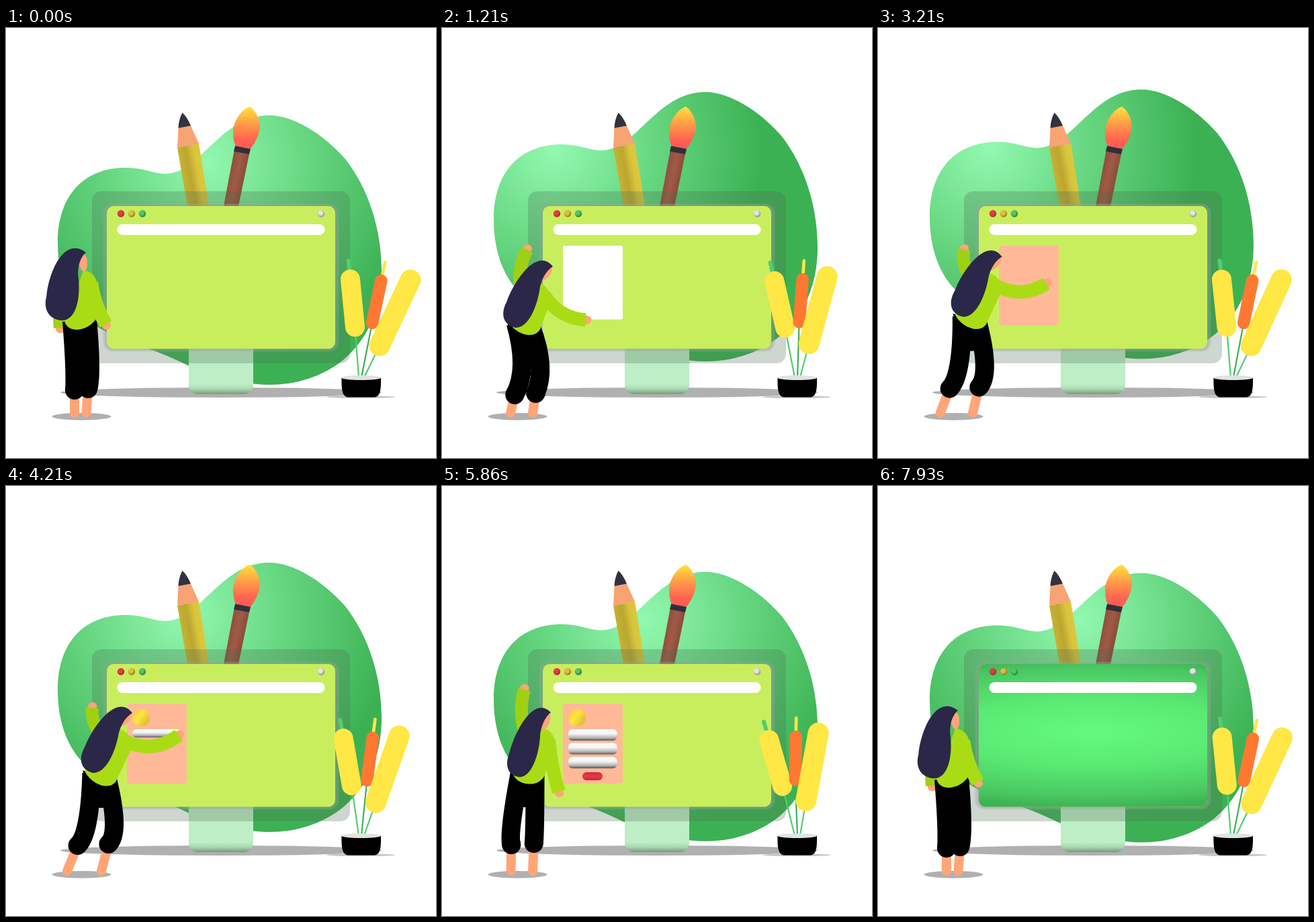
Animation, 640 px wide and 640 px high, one loop 8000 ms. Source, as an HTML page with a canvas:

```html
<!DOCTYPE html>
<html lang="en">
<head>
<meta charset="utf-8">
<title>Building a page</title>
<style>
html, body { margin: 0; width: 100%; height: 100%; overflow: hidden; background: #fff; }
canvas { display: block; width: 100vw; height: 100vh; }
</style>
</head>
<body>
<canvas id="stage"></canvas>
<script>
const LOOP = 8000, SIZE = 640;
const LIME = '#c9ee5d', SHIRT = '#aadc16', SKIN = '#ffa577', NAVY = '#2b2748';
const canvas = document.getElementById('stage');
const c = canvas.getContext('2d');
const ratio = window.devicePixelRatio || 1;
canvas.width = canvas.height = SIZE * ratio;

// --- timing ---
const lerp = (a, b, u) => a + (b - a) * u;
const mix = (a, b, u) => a.map((v, i) => lerp(v, b[i], u));
const span = (t, from, to) => Math.min(1, Math.max(0, (t - from) / (to - from)));
const ease = u => u * u * (3 - 2 * u);

// Quick rise, then a long sinking tail.
const lift = t => t < 2400
  ? 1 - (1 - t / 2400) ** 2.5
  : 1 / (1 + ((t - 2400) / 1580) ** 3.6);

// Two swings to the left and back.
const sway = t => span(t, 0, 2150) ** .8 - span(t, 2230, 3200) + span(t, 3100, 6100) - span(t, 6530, 7950);

// --- drawing helpers ---
function gradient(g, stops) {
  stops.forEach(([at, color]) => g.addColorStop(at, color));
  return g;
}
const linear = (x0, y0, x1, y1, ...stops) => gradient(c.createLinearGradient(x0, y0, x1, y1), stops);
const radial = (x, y, r, ...stops) => gradient(c.createRadialGradient(x, y, 0, x, y, r), stops);

function fill(path, color) {
  c.fillStyle = color;
  c.fill(new Path2D(path));
}
function box(x, y, w, h, r, color) {
  if (w <= 0 || h <= 0) return;
  c.beginPath();
  c.roundRect(x, y, w, h, r);
  c.fillStyle = color;
  c.fill();
}
function oval(x, y, rx, ry, color, angle = 0) {
  c.beginPath();
  c.ellipse(x, y, rx, ry, angle, 0, Math.PI * 2);
  c.fillStyle = color;
  c.fill();
}
const disc = (x, y, r, color) => oval(x, y, r, r, color);

function line(points, width, color, cap = 'round') {
  c.lineWidth = width;
  c.lineCap = cap;
  c.strokeStyle = color;
  const [from, to, end] = points;
  c.stroke(new Path2D(end ? `M${from}Q${to} ${end}` : `M${from}L${to}`));
}
function layer(alpha, draw) {
  c.save();
  c.globalAlpha *= alpha;
  draw();
  c.restore();
}

// --- scenery ---
const BLOB = 'M392 130C425 130 470 155 505 195C540 240 559 300 559 362C559 415 540 462 502 494' +
  'C470 520 430 531 392 531C340 530 300 517 262 498C215 475 180 470 140 447C100 425 77 380 77 320' +
  'C77 250 115 208 178 208C205 208 220 217 237 217C289 217 319 130 392 130Z';

function drawBlob(t) {
  const up = lift(t);
  layer(1, () => {
    c.translate(0, -42 * up);
    fill(BLOB, radial(300 - 135 * ease(ease(up)), 200 + 20 * up, 310,
      [0, '#92f9b0'], [.5, '#65d57f'], [1, '#3cb153']));
  });
}

function drawTools() {
  fill('M255 178L287 171.500L302 265H270Z', linear(262, 222, 294, 216,
    [0, '#c8b334'], [.4, '#bba631'], [.75, '#d9c53c'], [1, '#dcc83d']));
  fill('M256.500 149L275 145.500L287 172L255 178Z', '#f8a373');
  fill('M262.500 126Q257 136 256.500 149L275 145.500Q270 133 262.500 126Z', '#32323f');
  fill('M339.500 183L362 187.500L346 265H324Z', linear(331, 222, 354, 227,
    [0, '#8f4f3d'], [.5, '#a05b45'], [1, '#8a4b3b']));
  fill('M363 117C350 121 337 140 338 157C338 165 340 171 342 177L363 181C370 172 377 160 378 147C378 135 371 122 363 117Z',
    linear(0, 117, 0, 180, [0, '#ffe53a'], [.4, '#ff9c48'], [.8, '#ff6250'], [1, '#ff5a50']));
  fill('M341 175.500L364 180L362 188L339 183.500Z', '#2f2f3d');
}

function drawStand() {
  oval(320, 542.5, 239, 7.5, '#b0b0b0');
  box(272, 470, 96, 75, [0, 0, 14, 14],
    linear(0, 470, 0, 545, [0, '#bfeec6'], [.8, '#bdeec5'], [.9, '#a9d6b1'], [1, '#779a7d']));
}

function drawScreen(green) {
  box(128, 243, 384, 256, 14, 'rgba(74,104,78,.27)');
  box(144.5, 261.5, 351, 220, 14, 'rgba(160,165,162,.32)');
  box(147.5, 263, 345, 216.5, 12, 'rgba(130,150,130,.25)');
  box(150, 265, 340, 212.5, 10, LIME);
  layer(green, () => {
    c.beginPath();
    c.roundRect(150, 265, 340, 212.5, 10);
    c.clip();
    c.translate(320, 366);
    c.scale(4, 1);
    c.fillStyle = radial(0, 0, 112, [0, '#64fa7e'], [.45, '#5aea73'], [.85, '#4ac862'], [1, '#3db353']);
    c.fillRect(-45, -105, 90, 220);
  });
  const dots = [[171, '#e8394a', '#a82433'], [187, '#e2bd3c', '#93741f'],
    [203, '#55c46d', '#237a3b'], [469, '#e4e4e4', '#8d8d8d']];
  for (const [x, light, dark] of dots)
    disc(x, 276.3, 5.2, radial(x - 1, 275, 6.5, [0, light], [.45, light], [1, dark]));
  box(165.5, 292, 309, 16, 8, '#fff');
}

// --- page content ---
function drawCard(t, blue) {
  box(180, 324, 89, 119 * span(t, 650, 1258), 3, '#fff');
  box(180, 324, 89, 119 * span(t, 2180, 2780), 3, '#ffb997');
  layer(blue, () => box(180, 324, 89, 119, 3, '#d5edff'));
  disc(201, 345, 13 * ease(span(t, 3250, 3600)),
    linear(190, 336, 213, 353, [0, '#f3d038'], [.4, '#ffe443'], [1, '#dcb735']));
  for (let i = 0; i < 3; i++) {
    const y = 362 + 20.6 * i, h = 17 * span(t, 3950 + 450 * i, 4310 + 450 * i);
    box(188, y, 72.5, h, 6, linear(0, y, 0, y + h, [0, '#fff'], [.4, '#f4f4f4'], [.75, '#b5b5b5'], [1, '#555']));
  }
  const w = 30 * ease(span(t, 5280, 5550));
  box(224 - w / 2, 426, w, 12, 6, linear(0, 426, 0, 438, [0, '#c92d39'], [.5, '#e63a47'], [1, '#c62b37']));
}

function drawPanel(t) {
  layer(1, () => {
    c.beginPath();
    c.rect(300, 324, 157 * ease(span(t, 6100, 6450)), 119);
    c.clip();
    box(300, 324, 157, 119, 1, linear(300, 0, 304, 0, [0, '#a9c948'], [1, LIME]));
    ['#d8323f', '#c9a52f', '#3fa356'].forEach((color, i) => disc(435.3 + 6.6 * i, 333, 2.2, color));
    c.globalAlpha *= span(t, 6350, 6650);
    disc(384, 359, 11.7, SHIRT);
    const hills = new Path2D('M365 358L379.500 392L387.500 381L400.500 412H346Z');
    c.fillStyle = c.strokeStyle = '#8fb414';
    c.lineWidth = 6;
    c.lineJoin = 'round';
    c.fill(hills);
    c.stroke(hills);
  });
}

// --- plant: head and foot of each spike, at rest and fully bent ---
const reeds = [
  { x: 525, stem: '#52cd6e', head: '#ffe745', width: 29, tip: '#52cd6e', tipWidth: 6,
    rest: [512.5, 374, 519.5, 445], bent: [484.5, 378, 505.5, 447] },
  { x: 529, stem: '#3fae57', head: '#ff7832', width: 18.5, tip: '#ffe745', tipWidth: 4.6,
    rest: [558.5, 376, 545, 439], bent: [524, 373, 524, 437] },
  { x: 533, stem: '#52cd6e', head: '#ffe745', width: 31,
    rest: [602, 375, 556, 473], bent: [556.5, 367, 540.5, 468] }
];

function drawPlant(t) {
  oval(528, 549.2, 51, 1.8, '#c4c4c4');
  for (const r of reeds) {
    const [x, y, fx, fy] = mix(r.rest, r.bent, sway(t));
    const k = 28 / Math.hypot(x - fx, y - fy);
    line([[r.x, 520], [fx, fy]], 2.2, r.stem);
    if (r.tip) line([[x, y], [x + (x - fx) * k, y + (y - fy) * k]], r.tipWidth, r.tip);
    line([[x, y], [fx, fy]], r.width, r.head);
  }
  fill('M499.500 520.500C499 540 501 549.500 510 549.500H547.500C556.500 549.500 558.500 540 558 520.500Z', '#000');
  oval(528.7, 520.5, 29.3, 3.6, '#e2e2e2');
}

// --- woman: head is [x, y, tilt in degrees, hair width]; knees and feet are x only ---
const idle = { head: [119, 334, 19, 1.18], neck: [115, 361], hip: [109.5, 435],
  knees: [102, 125], feet: [102, 119.5], hand: [148.5, 441], back: [80.5, 446] };
const bend = { head: [165, 355, 32, 1.05], neck: [140, 379], hip: [121, 442],
  knees: [119, 146], feet: [102, 135], hand: [214, 434.5], back: [126.5, 330] };
const reach = { head: [156, 330, 21.6, 1], neck: [147, 360], hip: [127, 430],
  knees: [104, 138], feet: [102.5, 129.5], hand: [204.5, 338], back: [122.5, 303] };
const lean = { head: [188, 338, 34, 1.05], neck: [166, 362], hip: [139, 431],
  knees: [121, 161], feet: [91, 142], hand: [257, 371], back: [128.5, 330] };
const stand = { ...reach, head: [162, 337, 26, 1], feet: [102.5, 135], hand: [174, 455] };
const lower = { ...lean, hand: [253, 412] };
const press = { ...lean, hand: [226, 430] };

const schedule = [[0, idle], [650, reach], [1210, bend], [1400, bend], [2050, reach], [2210, reach],
  [2780, bend], [3350, lean], [4250, lean], [5130, lower], [5350, press],
  [5780, stand], [6070, stand], [6930, idle], [LOOP, idle]];

function poseAt(t) {
  const i = schedule.findIndex(([at]) => at > t);
  const [from, a] = schedule[i - 1], [to, b] = schedule[i];
  const u = ease(span(t, from, to)), pose = {};
  for (const part in a) pose[part] = mix(a[part], b[part], u);
  return pose;
}

function arm(shoulder, elbow, hand, width, color) {
  const k = 1.5 / Math.hypot(hand[0] - elbow[0], hand[1] - elbow[1]);
  disc(hand[0] + (hand[0] - elbow[0]) * k, hand[1] + (hand[1] - elbow[1]) * k, 6.7, SKIN);
  line([shoulder, elbow, hand], width, color, 'butt');
}

// The trouser leg keeps its length, so the hem slides along the shin.
function leg(top, kneeX, footX, hemY) {
  const hem = [lerp(kneeX, footX, (hemY - 500) / 73), hemY];
  line([hem, [footX, 573]], 14, SKIN);
  const bow = [2 * kneeX - (top[0] + hem[0]) / 2, 1000 - (top[1] + hem[1]) / 2];
  line([top, bow, hem], 28, '#000', 'butt');
  disc(...hem, 14, '#000');
}

function drawHead([x, y, tilt, width]) {
  const rad = Math.PI / 180;
  layer(1, () => {
    c.translate(x, y);
    c.rotate(tilt * rad);
    oval((22 - tilt) * .35, 15.5, 6.3, 13, SKIN, ((tilt - 20) * 3.6 - tilt) * rad);
    c.scale(width, 1);
    fill('M0 0C-5 10 -4 24 0 36C13 66 16 100 0 107C-17 113 -28 100 -29 81C-36 49 -34 -13 0 0Z', NAVY);
  });
}

function drawWoman(t) {
  const { head, neck: [nx, ny], hip: [hx, hy], knees, feet, hand, back } = poseAt(t);
  const slope = (head[2] - 23) / 1.4;
  const left = [hx - 25, hy - slope], right = [hx + 25, hy + slope];

  oval(112.5, 578.3, 44, 5.4, '#b0b0b0');
  const rear = [nx - 23, ny + 10];
  arm(rear, [(rear[0] + back[0]) / 2 - 10, (rear[1] + back[1]) / 2], back, 19, '#a0d014');

  leg(mix(left, right, .27), knees[0], feet[0], hy + 104);
  leg(mix(left, right, .73), knees[1], feet[1], hy + 102);
  fill(`M${left}L${right}L${hx + 6} ${hy + 48}L${hx - 6} ${hy + 48}Z`, '#000');

  fill(`M${nx} ${ny}C${nx + 12} ${ny} ${nx + 23} ${ny + 11} ${nx + 21} ${ny + 29}L${right}` +
    `C${right[0] - 10} ${right[1] + 17} ${left[0] + 10} ${left[1] + 19} ${left[0] + 3} ${left[1]}Z`, SHIRT);

  const front = [nx + 12, ny + 18];
  const dx = hand[0] - front[0], dy = hand[1] - front[1];
  const sag = .3 * dx / Math.hypot(dx, dy);
  arm(front, [front[0] + dx / 2 - dy * sag, front[1] + dy / 2 + dx * sag], hand, 20, SHIRT);
  drawHead(head);
}

function draw(t) {
  c.setTransform(ratio, 0, 0, ratio, 0, 0);
  c.fillStyle = '#fff';
  c.fillRect(0, 0, SIZE, SIZE);
  const green = span(t, 6050, 6550);
  drawBlob(t);
  drawTools();
  drawStand();
  drawScreen(green);
  layer(1 - span(t, 7300, 7700), () => {
    drawCard(t, green);
    drawPanel(t);
  });
  drawPlant(t);
  drawWoman(t);
}

const start = performance.now();
function tick() {
  draw((performance.now() - start) % LOOP);
  requestAnimationFrame(tick);
}
tick();
</script>
</body>
</html>
```
